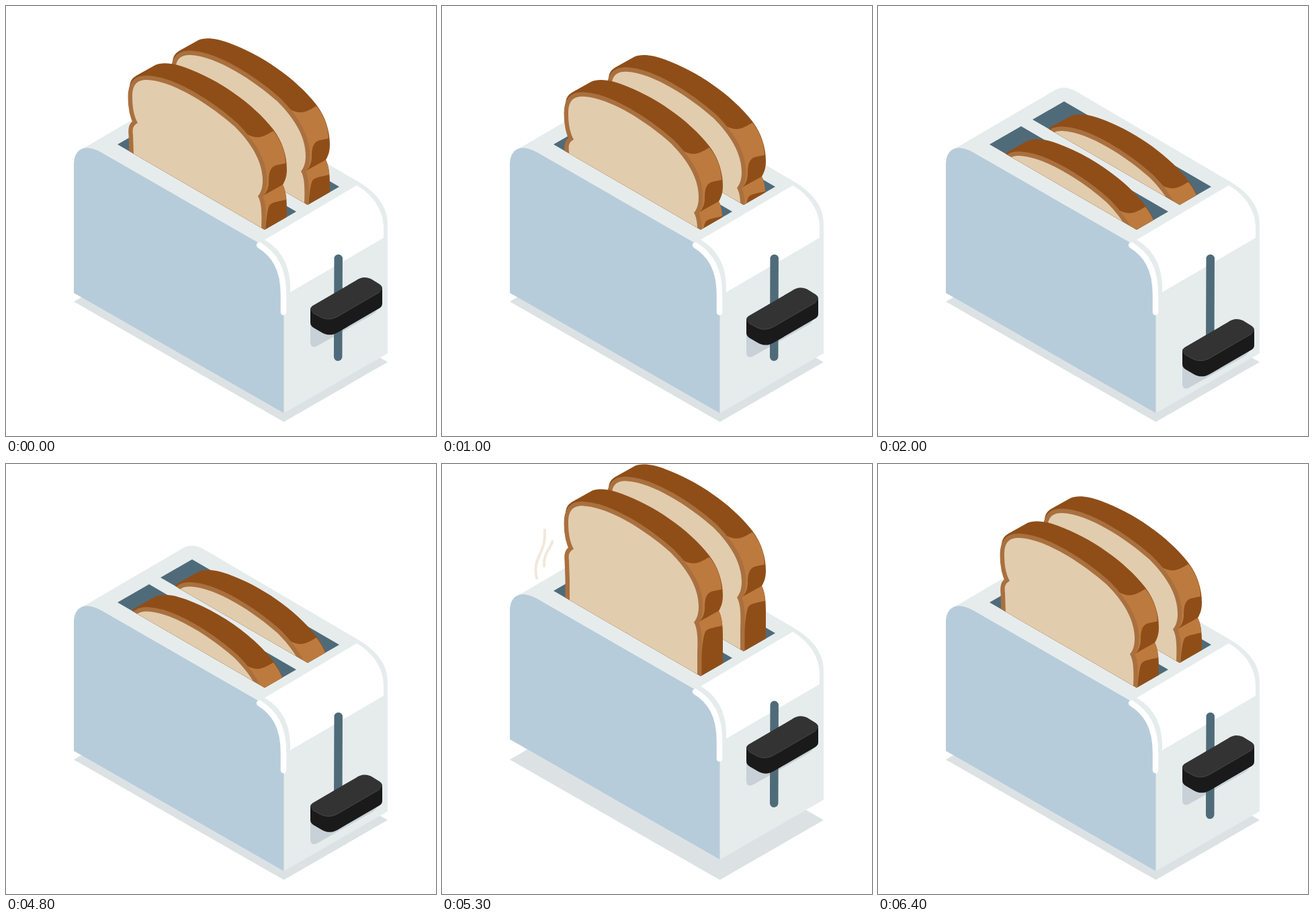
These frames come from a looping animation (640 px wide and 640 px high, 7200 ms). An HTML page:

```html
<!DOCTYPE html>
<html lang="en">
<head>
<meta charset="utf-8">
<title>Toaster</title>
<style>
  html, body { margin: 0; width: 100%; height: 100%; overflow: hidden; background: #fff; }
  svg { display: block; width: 100vw; height: 100vh; }
  .line { fill: none; stroke-linecap: round; stroke-linejoin: round; }
  .steam { stroke: #f2e8db; stroke-width: 4; }
</style>
</head>
<body>
<svg viewBox="0 0 640 640">
  <defs>
    <clipPath id="mouth"><path d="M166 206L385 333L432 306V-200H166Z"/></clipPath>
    <path id="face" d="M190 480V220L189 192C188 182 189 178 196 174C190 163 188 150 188 135C188 118 194 109 211 110C250 112 305 148 340 179C366 205 382 232 382 260C382 269 380 277 375 283C380 292 381 305 380 329V480Z"/>
    <!-- one slot with its slice of bread -->
    <g id="bay">
      <path fill="#4f6b7a" d="M166 206L213 179L432 306L385 333Z"/>
      <g clip-path="url(#mouth)">
        <g id="slice">
          <path fill="#8f4e18" d="M184 125C183 110 190 106 196 102.500L222 88C232 83 250 85 268 92C315 109 367 144 398 184C412 202 418 224 418 243C418 253 416 259 412 266C417 276 418 288 418 305V480H200V130Z"/>
          <path fill="#bd7a3e" d="M352 186C362 195 374 197 382 194C390 191 394 188 398 186C408 198 416 216 416 234C408 236 402 236 398 239C392 243 391 252 391 262C391 270 388 277 384 281L360 260ZM383 282L412 266C415 273 417 281 417 288C408 291 396 291 392 297C389 303 388 315 386 333V480H370V283Z"/>
          <use href="#face" fill="#a9703f" stroke="#a9703f" stroke-width="13" stroke-linejoin="round"/>
          <use href="#face" fill="#e2ccae"/>
        </g>
      </g>
    </g>
  </defs>

  <path fill="#dce2e4" d="M101 440L413.500 619L568 530L256 350Z"/>

  <g id="toaster">
    <path fill="#e6ecec" d="M101 427V235C101 219 108 215 120 209L262 126Q275 117 293 126L520 259C550 276 568 297 568 325V517L413.500 606Z"/>
    <path fill="#b7ccda" d="M101 427V237C101 212 117 204 142 218L375 352C400 368 413.500 392 413.500 430V606Z"/>
    <path fill="#fff" d="M385 348L522 267C548 282 562 306 562 330V345L423 426V418C423 385 408 361 385 348Z"/>
    <path class="line" stroke="#fff" stroke-width="8.500" d="M377 356C400 370 413 392 413 430V456"/>
    <use href="#bay" x="64" y="-37"/>
    <use href="#bay"/>
    <path id="shade" fill="#c8d1d7" d="M453 470V500C453 508 458 509 465 505L545 459.500C551 456 555 450 555 440Z"/>
    <path class="line" stroke="#4f6b7a" stroke-width="12.500" d="M494.700 376L494.200 522"/>
    <g id="lever">
      <path fill="#1a1a1a" d="M453 451V471C453 475 455 477 458 479L470 486C478 490.500 486 490.500 494 485.700L555 450.300C559 448 560 446 560 442V421Z"/>
      <path fill="#333" d="M457 445.700L521 408.500Q531 401 543 406L556 414Q564 420 556 426L494 462Q482 469 470 464L457 457Q449 451 457 445.700Z"/>
      <path class="line" stroke="#666" stroke-width=".5" d="M457 457L470 464Q482 469 494 462L556 426"/>
    </g>
  </g>

  <g id="steam">
    <path class="line steam" pathLength="1" d="M141 170C134 140 153 135 153 105C153 88 149 75 142 67"/>
    <path class="line steam" pathLength="1" d="M152 152C150 130 166 125 166 105Q166 96 165 89"/>
    <path class="line steam" pathLength="1" d="M491 168C484 138 503 133 503 104C503 86 500 72 494 59"/>
    <path class="line steam" pathLength="1" d="M503 150C501 128 517 123 517 103Q517 94 516 87"/>
  </g>
</svg>
<script>
const LOOP = 7200, STEP = 100;
const $ = id => document.getElementById(id);

// 0 to 1 between two times, sine in and out
const ease = (t, from, to) =>
  (1 - Math.cos(Math.PI * Math.min(1, Math.max(0, (t - from) / (to - from))))) / 2;

// value at time t through [time, value] keys
const track = (t, keys) => keys.slice(1).reduce(
  (v, [time, to], i) => v + (to - keys[i][1]) * ease(t, keys[i][0], time), keys[0][1]);

const press = [[715, 0], [1650, 72], [2000, 62], [4760, 62], [5050, -15], [5818, 0]];
const moves = {
  slice: [[702, 0], [1700, 121], [2000, 113], [4763, 113], [5150, -40], [5610, 0]],
  lever: press,
  shade: press,
  toaster: [[5000, 0], [5250, -18], [5625, 0]]
};

// start and duration of each wisp
const wisps = [[5020, 900], [5080, 780], [5450, 900], [5510, 780]];
const wispPaths = $('steam').children;

function draw(t) {
  for (const id in moves)
    $(id).setAttribute('transform', `translate(0 ${track(t, moves[id]).toFixed(2)})`);
  wisps.forEach(([start, span], i) => {
    const head = ease(t, start, start + span / 2);
    const tail = ease(t, start + span * .55, start + span);
    const { style } = wispPaths[i];
    style.visibility = head > tail ? 'visible' : 'hidden';
    style.strokeDasharray = `${head - tail} 3`;
    style.strokeDashoffset = -tail;
  });
}

const begin = performance.now();
function tick() {
  const t = (performance.now() - begin) % LOOP;
  draw(Math.floor(t / STEP) * STEP);
  requestAnimationFrame(tick);
}
tick();
</script>
</body>
</html>
```
